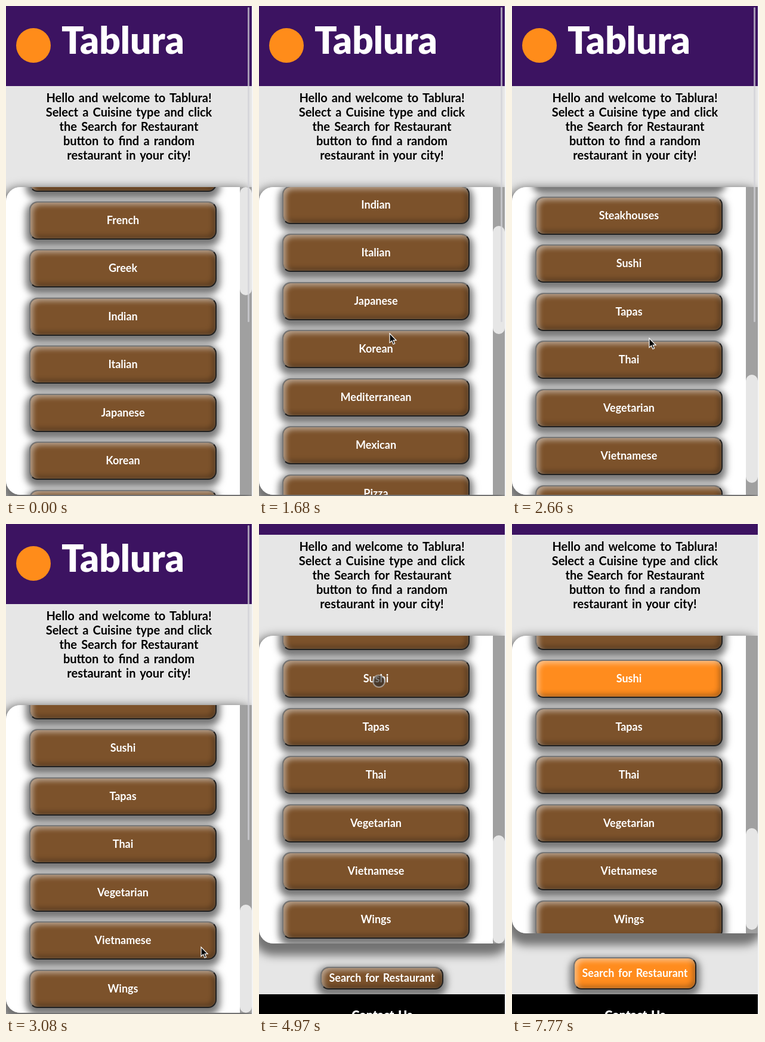
Animation of 414 by 820 pixels, one loop 8.54 s. Source, as an HTML page:

```html
<!DOCTYPE html>
<html lang="en">
<head>
<meta charset="utf-8">
<title>Tablura</title>
<style>
  html, body { margin: 0; width: 100%; height: 100%; overflow: hidden; background: #f4f4f4; }
  body { font: 700 18px/24px Lato, "Open Sans", sans-serif; word-spacing: .13em; }
  div, svg { position: absolute; box-sizing: border-box; }
  #stage { left: 0; top: 0; width: 414px; height: 820px; overflow: hidden; }
  #page { left: 0; top: 0; width: 412px; height: 1300px; background: #e6e6e6; clip-path: inset(0); }
  #head { width: 412px; height: 134px; background: #3c1361; }
  #mark { left: 17px; top: 37px; width: 58px; height: 58px; border-radius: 50%; background: #ff8c1a; }
  #name { left: 93px; top: 25px; font-weight: 900; font-size: 62px; line-height: 62px; color: #fff; }
  #intro { top: 141px; width: 412px; text-align: center; font-size: 20px; color: #000; }
  #list { top: 303px; width: 412px; border-radius: 24px; box-shadow: 0 10px 15px 10px #737373; }
  #view { inset: 0; overflow: hidden; border-radius: 24px 0 0 24px; background: #fff; }
  #items { left: 0; top: 0; width: 392px; }
  #track { right: 0; top: 0; width: 20px; height: 100%; background: #a0a0a0; }
  #grip { width: 20px; border-radius: 10px; background: #e6e6e6; }
  .button {
    left: 39px; width: 314px; height: 64px; padding-bottom: 2px; border: 2px solid;
    border-color: #767676 #212121 #212121 #767676; border-radius: 14px;
    background: #7c522b; color: #fff;
    display: flex; align-items: center; justify-content: center; white-space: nowrap;
    box-shadow: 0 6px 12px 6px #7a7a7a,
      inset 4px 4px 8px rgba(255,255,255,.48), inset -4px -4px 8px rgba(0,0,0,.3);
  }
  #search { left: 103px; width: 206px; }
  #foot { top: 903px; width: 412px; height: 400px; background: #000; color: #fff;
    text-align: center; font-size: 20px; font-weight: 900; padding-top: 22px; }
  #bar { left: 405px; width: 3px; height: 527px; border-radius: 2px; background: rgba(210,210,215,.7); }
  #arrow, #touch { left: 0; top: 0; }
</style>
</head>
<body>
<div id="stage">
  <div id="page">
    <div id="head">
      <div id="mark"></div>
      <div id="name">Tablura</div>
    </div>
    <div id="intro">Hello and welcome to Tablura!<br>Select a Cuisine type and click<br>the Search for Restaurant<br>button to find a random<br>restaurant in your city!</div>
    <div id="list">
      <div id="view">
        <div id="items"></div>
        <div id="track"><div id="grip"></div></div>
      </div>
    </div>
    <div id="search" class="button">Search for Restaurant</div>
    <div id="foot">Contact Us</div>
  </div>
  <div id="bar"></div>
  <svg id="arrow" width="16" height="22" viewBox="-1 -1 16 22" overflow="visible">
    <path d="M0 0V15.5L3.6 12.2L6 18L8.6 16.9L6.2 11.3H11Z" fill="#000" stroke="#fff" stroke-width="1.2"/>
  </svg>
  <svg id="touch" width="24" height="24" viewBox="-12 -12 24 24">
    <circle id="spot" r="10" stroke="rgba(205,205,205,.6)" stroke-width="2"/>
  </svg>
</div>
<script>
const LOOP = 8540, STEP = 70, PITCH = 80.45, MAX_SCROLL = 949;
const $ = id => document.getElementById(id);
const clamp = v => Math.min(1, Math.max(0, v));
const span = (t, a, b) => clamp((t - a) / (b - a));
const smooth = p => p * p * (3 - 2 * p);
const mix = (a, b, p) => a + (b - a) * p;
const place = (el, x, y) => { el.style.transform = `translate(${x}px, ${y}px)`; };

// The first button only shows its lower edge above the list.
const cuisines = ["", "French", "Greek", "Indian", "Italian", "Japanese", "Korean",
  "Mediterranean", "Mexican", "Pizza", "Seafood", "Soul Food", "Steakhouses",
  "Sushi", "Tapas", "Thai", "Vegetarian", "Vietnamese", "Wings"];
const buttons = cuisines.map((text, i) => {
  const el = document.createElement("div");
  el.className = "button";
  el.textContent = text;
  el.style.top = 24 + (i - 1) * PITCH + "px";
  $("items").append(el);
  return el;
});
const sushi = buttons[cuisines.indexOf("Sushi")];

// Pointer paths: time, x, y
const arrowPath = [[0, 420, 0], [560, 300, 42], [770, 300, 42], [910, 197, 700], [980, 197, 717],
  [1610, 218, 536], [1680, 219, 548], [1960, 219, 548], [2310, 230, 556], [2800, 230, 556],
  [3080, 327, 708], [3710, 300, 528]];
const touchPath = [[3780, 300, 528], [3920, 300, 528], [4270, 216, 300], [4340, 216, 300],
  [4550, 212, 281], [4620, 212, 281], [4830, 189, 251], [4970, 201, 263], [5530, 201, 263],
  [6370, 219, 619], [6440, 221, 648], [6790, 229, 751], [7210, 229, 751], [7770, 214, 836]];

function along(path, t) {
  let i = 1;
  while (i < path.length - 1 && path[i][0] < t) i++;
  const [a, b] = [path[i - 1], path[i]];
  const p = span(t, a[0], b[0]);
  return [mix(a[1], b[1], p), mix(a[2], b[2], p)];
}

// Two flicks; the list rests on whole pixels.
function listScroll(t) {
  const rest = 1 - span(t, 817, 1610);
  return Math.round(mix(187 * (1 - rest * rest), MAX_SCROLL, smooth(span(t, 1960, 2800))));
}

function paint(p) {
  return `rgb(${mix(124, 255, p)}, ${mix(82, 140, p)}, ${mix(43, 30, p)})`;
}

function draw(t) {
  const page = Math.round(116 * smooth(span(t, 3080, 3780)));
  const chosen = smooth(span(t, 5530, 5950));
  const scroll = listScroll(t);

  place($("page"), 0, -page);
  place($("items"), 0, -scroll);
  place($("bar"), 0, Math.round(2 + page * .643));
  $("bar").style.opacity = 1 - span(t, 3920, 4550);

  const height = mix(515, 498, chosen);
  const grip = mix(181, 170, chosen);
  const range = MAX_SCROLL + 515 - height;
  $("list").style.height = height + "px";
  $("grip").style.height = grip + "px";
  place($("grip"), 0, Math.floor((height - grip) * scroll / range));

  sushi.style.backgroundColor = $("search").style.backgroundColor = paint(chosen);
  $("search").style.top = mix(856.5, 840.5, chosen) + "px";
  $("search").style.height = mix(38, 54, chosen) + "px";

  const touching = t >= 3780;
  $("arrow").style.display = touching ? "none" : "block";
  $("touch").style.display = touching ? "block" : "none";
  const [x, y] = along(touching ? touchPath : arrowPath, t);
  if (touching) place($("touch"), x - 12, y - 12);
  else place($("arrow"), x - 1, y - 1);
  const pressed = t >= 5250 && t < 5390;
  $("spot").setAttribute("fill", `rgba(40,40,40,${pressed ? .8 : .6})`);
}

const start = performance.now();
function tick() {
  const t = (performance.now() - start) % LOOP;
  draw(Math.floor(t / STEP) * STEP);
  requestAnimationFrame(tick);
}
tick();
</script>
</body>
</html>
```
